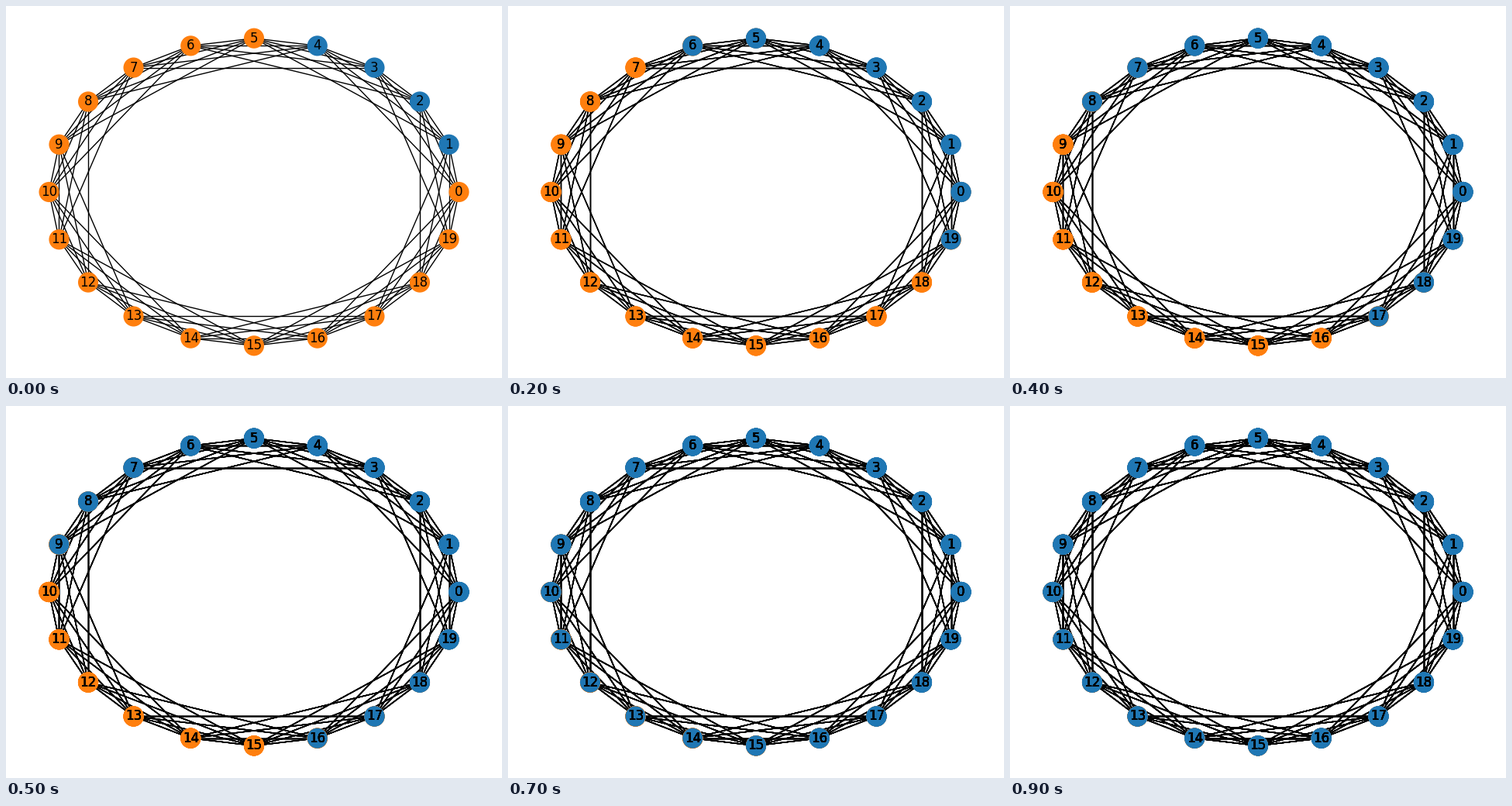
A matplotlib script that plays this animation: 640x480 px, repeating every 1 s.

```python
import matplotlib.pyplot as plt
import numpy as np
from matplotlib.animation import FuncAnimation
from matplotlib.collections import LineCollection

plt.rcParams["font.family"] = "DejaVu Sans"

NODES = 20
REACH = 4          # each node links to this many neighbours per side
THRESHOLD = 0.5    # share of active neighbours that activates a node
FRAMES = 10
INTERVAL = 100
ACTIVE, IDLE = "#1f77b4", "#ff7f0e"

angles = 2 * np.pi * np.arange(NODES) / NODES
points = np.column_stack([np.cos(angles), np.sin(angles)])
edges = [(points[i], points[(i + step) % NODES])
         for i in range(NODES) for step in range(1, REACH + 1)]

fig = plt.figure(figsize=(6.4, 4.8), dpi=100, facecolor="white")
ax = fig.add_axes((0, 0, 1, 1))
ax.set(xlim=(-1.21, 1.21), ylim=(-1.21, 1.21))
ax.axis("off")


def spread(active):
    """One contagion step around the ring."""
    neighbours = sum(np.roll(active, s).astype(int) + np.roll(active, -s)
                     for s in range(1, REACH + 1))
    return active | (neighbours >= THRESHOLD * 2 * REACH)


def draw_graph(active):
    """Draw the whole network once and return its artists."""
    lines = ax.add_collection(
        LineCollection(edges, colors="black", linewidths=1, zorder=1),
        autolim=False)
    dots = ax.scatter(*points.T, s=300, linewidths=1.5, zorder=2,
                      c=[ACTIVE if a else IDLE for a in active])
    labels = [ax.text(x, y, str(i), size=12, ha="center", va="center")
              for i, (x, y) in enumerate(points)]
    return [lines, dots, *labels]


active = np.isin(np.arange(NODES), [1, 2, 3, 4])
layers = []
for _ in range(FRAMES):
    layers.append(draw_graph(active))
    active = spread(active)


def update(frame):
    # Earlier drawings stay underneath, so lines and labels grow heavier.
    for index, layer in enumerate(layers):
        for artist in layer:
            artist.set_visible(index <= frame)
    return []


animation = FuncAnimation(fig, update, frames=FRAMES, interval=INTERVAL,
                          repeat=True, repeat_delay=0)
plt.show()
```
